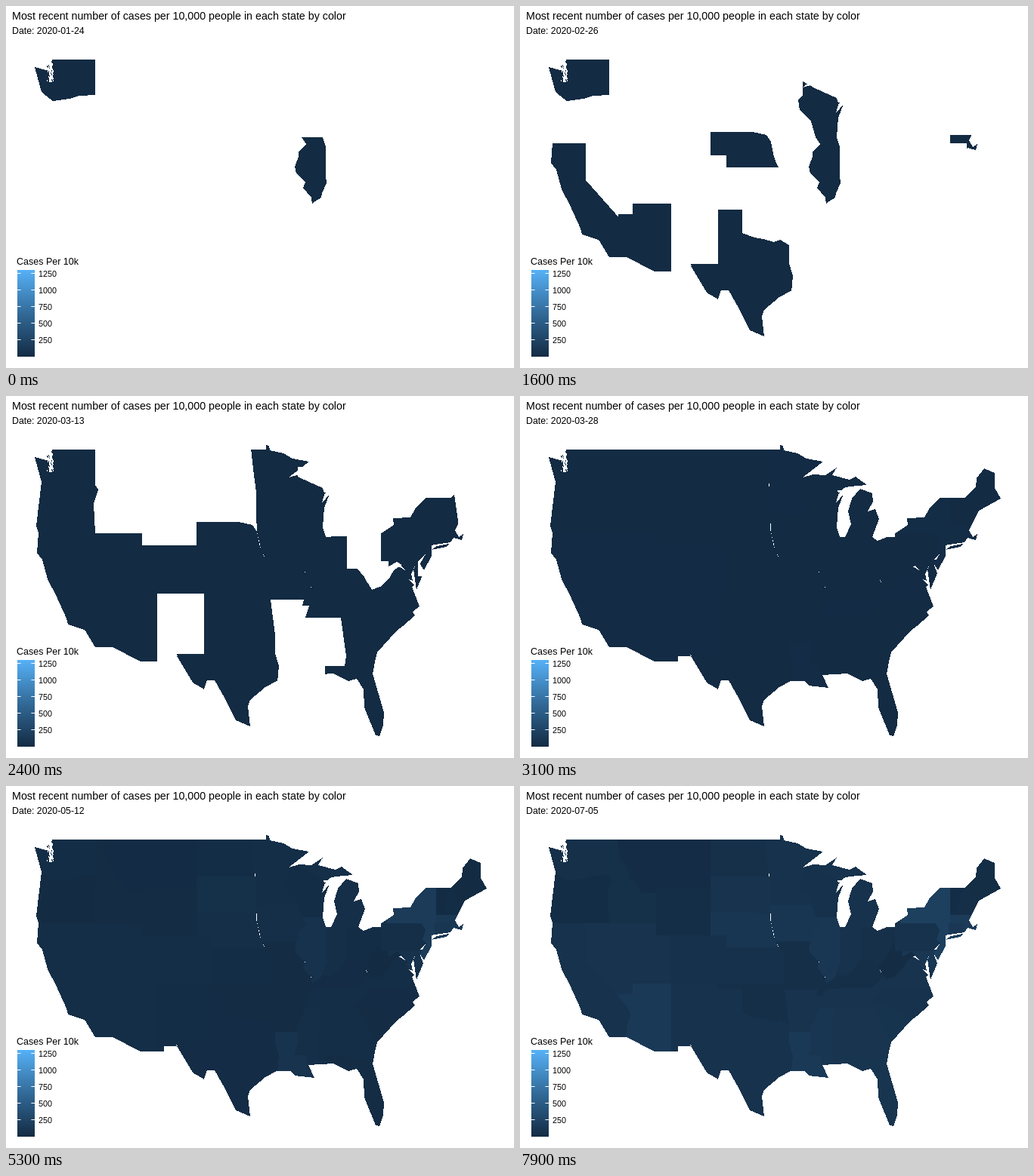
These frames come from a looping animation (672x480 px, 8000 ms). An HTML page:

```html
<!DOCTYPE html>
<html>
<head>
<meta charset="utf-8">
<style>
  html, body { margin: 0; width: 100%; height: 100%; overflow: hidden; background: #fff; }
  svg { display: block; font-family: "Liberation Sans", Arial, sans-serif; }
</style>
</head>
<body>
<svg width="672" height="480" viewBox="0 0 672 480">
  <defs>
    <linearGradient id="ramp" x1="0" y1="1" x2="0" y2="0">
      <stop stop-color="#132b43"/>
      <stop offset=".5" stop-color="#326a98"/>
      <stop offset="1" stop-color="#56b1f7"/>
    </linearGradient>
  </defs>
  <g shape-rendering="crispEdges">
    <g id="map"></g>
    <path id="sea" fill="#fff" fill-rule="evenodd"/>
  </g>
  <text x="8" y="18" font-size="14.28">Most recent number of cases per 10,000 people in each state by color</text>
  <text id="date" x="8" y="37" font-size="12.3"></text>
  <text x="14" y="343" font-size="12.5">Cases Per 10k</text>
  <rect x="15" y="350" width="23" height="115" fill="url(#ramp)"/>
  <g id="ticks" font-size="10.8"></g>
</svg>
<script>
const get = id => document.getElementById(id);
const box = (x, y, r, b) => `M${x} ${y}H${r}V${b}H${x}`;

// States overlap: later ones cover earlier ones, and the sea trims the coast.
const west = {
  ID: box(115, 71, 180, 182),
  WA: box(30, 60, 118, 130),
  OR: 'M30 113L47 114 58 123 62 126 84 123 97 119 118 118 122 124 116 143 118 182H30',
  MT: 'M129 71H252V135H180V142H160L150 123 145 125 142 107 132 96',
  UT: box(149, 182, 200, 262),
  WY: box(180, 135, 252, 198),
  NV: box(87, 182, 149, 290),
  AZ: 'M149 262H200V355H130V276H149',
  CA: 'M30 182H87V231L142 293 147 304 141 319 140 340H30',
  CO: box(200, 198, 273, 262),
  NM: box(200, 262, 262, 355)
};
const plains = {
  ND: box(252, 71, 329, 120),
  SD: box(252, 120, 331, 180),
  MN: 'M323 60H410V158H331V128L327 97',
  IA: 'M331 158H400V206H338L332 180',
  NE: 'M252 167H308L326 171 332 180 336 200 342 214H273V198H252',
  KS: box(273, 214, 350, 262),
  OK: box(262, 262, 356, 320),
  AR: 'M350 270L356 317V326H404V270',
  MO: 'M338 206H384L410 270 402 278H392L394 270H350V227L342 213',
  LA: box(354, 326, 412, 392),
  TX: 'M262 270H294V301L310 307 322 309 336 313 344 310 356 317V341L361 358 358 390 330 450 226 400V342H262'
};
const lakes = {
  MI: 'M386 94H480V187H429V125H386',
  WI: 'M374 100V118L368 125 370 138 385 153 391 174H430V128H421L419 122 390 109',
  IN: box(415, 186, 451, 258),
  IL: 'M391 174H423V225L424 235 418 248 417 254 405 263 404 254 393 241 396 234 384 222 382 213 387 200V193L397 183',
  OH: box(451, 187, 496, 240)
};
const south = {
  NC: box(456, 268, 550, 315),
  VA: 'M463 268L500 225 513 222 531 233 560 240V268',
  KY: 'M451 229H465L474 240 481 253 463 270H402L406 261 417 254 418 250 430 252 440 245',
  TN: 'M396 294L404 270 430 268H484L456 294',
  SC: 'M466 294L473 291H491L494 297H503L516 312 495 345H466',
  FL: box(422, 358, 510, 455),
  GA: 'M443 294H466L474 309 491 340 486 361 451 362 448 358 450 345',
  AL: 'M410 294H443L450 345 448 358H422V372H410',
  MS: 'M396 294H416L413 340 414 375H398V357H381L386 340 385 320'
};
const east = {
  MD: 'M506 219H545L547 239H552L549 244H536L529 238 531 233 517 220 506 228',
  WV: 'M496 204V219H506V226L517 220 524 224 513 231 508 240 497 252 484 257 474 240 483 229',
  DE: box(545, 217, 556, 239),
  NY: box(503, 130, 570, 210) + box(570, 196, 588, 206),
  PA: 'M496 175H503V182H550L555 191 551 204 556 208 545 219H496',
  NJ: 'M555 191L566 198V235H552L548 222 556 208 551 204',
  ME: box(588, 90, 640, 170),
  VT: box(569, 130, 589, 171),
  NH: 'M589 130H593L599 172H580V158',
  MA: box(569, 171, 607, 195),
  CT: box(567, 182, 587, 198),
  RI: box(587, 182, 591, 196)
};

const northCoast = `M61 71H344V65L348 66 349 72 367 76 379 83 401 87 374 108 388 104 404 105
  419 95 413 105 436 111 444 107 459 118 436 120 428 122 421 131 418 142 428 130 421 148
  419 174 423 187 430 187 438 170 434 153 439 136 450 123 466 129 467 140 460 153 470 150
  475 163 466 187 473 192 495 183 513 171 512 162 535 161 541 150 555 135 589 135`;
const eastCoast = ` 593 130 603 121 604 109 614 96 628 102V122L636 136 607 152 594 178 599 187 605 183
  603 191 592 188 588 194 567 197 563 198V212L553 231 547 222 552 235 543 257 539 230 543 221
  536 236 538 245 532 243 540 250 537 253 547 279 538 286 541 291 525 305 516 312 491 340 485 368`;
const gulfCoast = ` 500 420 499 437 494 451 489 450 474 413 473 389 464 375 453 378 433 368 400 370
  408 387 382 384 377 378 358 378 343 386 323 403 320 412 323 438 304 430 289 400 276 377
  266 377 262 389 247 380 225 343`;
const westCoast = ` 228 345H209V352H178L141 333 118 333 104 310 82 303 80 295 66 264 55 243
  48 217 41 208 43 182 40 172 47 114 38 81 57 86V101H61L63 90z`;
const island = 'M563 204L570 199 586 196 582 200z';

// ragged inlet: small squares that swap land and water
let seed = 7;
const random = () => (seed = seed * 16807 % 2147483647) / 2147483647;
const specks = Array.from({length: 22}, () => {
  const x = 54 + Math.floor(random() * 9), y = 72 + Math.floor(random() * 29);
  return box(x, y, x + 1, y + 2) + 'z';
}).join('');

get('sea').setAttribute('d', box(0, 50, 672, 470) + 'z' +
  northCoast + eastCoast + gulfCoast + westCoast + island + specks);

// cases per 10k people in early July
const july = {
  NY: 204, NJ: 195, RI: 160, MA: 158, LA: 141, AZ: 135, CT: 131, DE: 123, IL: 116, MD: 114,
  NE: 103, MS: 102, IA: 99, FL: 93, AL: 89, GA: 88, SC: 87, SD: 79, AR: 79, VA: 78, UT: 77,
  NV: 77, TN: 76, MI: 72, TX: 72, PA: 71, IN: 71, NC: 70, CA: 69, MN: 68, NM: 64, WI: 58,
  CO: 57, KS: 56, WA: 49, OH: 49, ND: 49, ID: 46, NH: 43, OK: 40, MO: 40, KY: 38, WY: 28,
  ME: 25, OR: 24, VT: 19, WV: 18, MT: 11
};
const growth = name =>
  /NY|NJ|MA|CT|RI/.test(name) ? .78 :
  /IL|IN|PA|MI|CO|DE|MD|LA|SD|NH/.test(name) ? .56 :
  /AZ|FL|SC|TX|AR|NC/.test(name) ? .19 : .38;

// states that come in at each tenth of a second
const arrivals = ('WA IL,AZ CA,,,MA,,WI,,,,TX,,NE,,,,,UT,OR,FL NY RI GA NH,NC NJ,CO MD NV TN,' +
  'IN KY MN OK PA SC,,KS MO VT VA CT IA,LA OH MI SD,AR DE MS NM ND WY ME,AL ID MT WV').split(',');

const shapes = {...west, ...plains, ...lakes, ...south, ...east};
const names = Object.keys(shapes);
get('map').innerHTML = names.map(n => `<path d="${shapes[n]}"/>`).join('');
const paths = [...get('map').children];
const starts = names.map(n => arrivals.findIndex(group => group.includes(n)));

get('ticks').innerHTML = [...Array(5).keys()].map(i => {
  const y = 355 + 22 * i;
  return `<path d="M15 ${y - .5}h4.6M33.4 ${y - .5}h4.6" stroke="#fff"/>
    <text x="43" y="${y + 4}">${1250 - 250 * i}</text>`;
}).join('');

const lerp = (a, b, t) => a + (b - a) * Math.min(1, Math.max(0, t));
const low = [19, 43, 67], high = [86, 177, 247];
const shade = v => `rgb(${low.map((c, i) => Math.round(lerp(c, high[i], v / 1310)))})`;

// days are counted from Jan 24
function cases(name, day) {
  const end = july[name], may = end * growth(name), march = may * .15;
  if (day < 64) return lerp(0, march, (day - 48) / 16);
  if (day < 109) return lerp(march, may, (day - 64) / 45);
  return lerp(may, end, (day - 109) / 54);
}

let shown = -1;
function draw(now) {
  const step = Math.floor(now % 8000 / 100);
  if (step !== shown) {
    shown = step;
    const day = Math.floor(step * 2.06 + .3);
    const date = new Date(Date.UTC(2020, 0, 24 + day));
    get('date').textContent = 'Date: ' + date.toISOString().slice(0, 10);
    names.forEach((name, i) =>
      paths[i].setAttribute('fill', step < starts[i] ? '#fff' : shade(cases(name, day))));
  }
  requestAnimationFrame(draw);
}
draw(performance.now());
</script>
</body>
</html>
```
